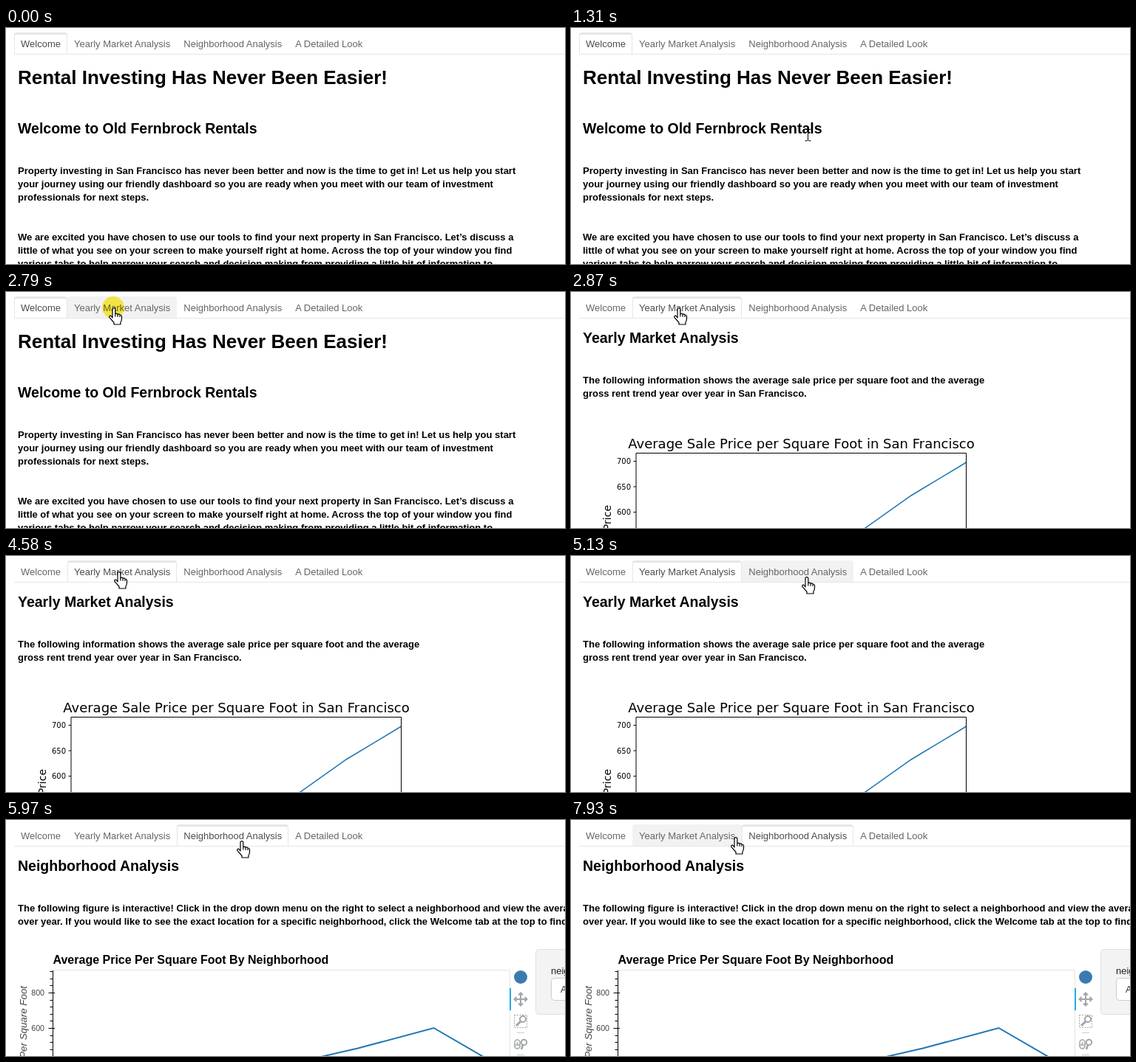
These frames come from a looping animation (756x320 px, 8000 ms). An HTML page:

```html
<!DOCTYPE html>
<html lang="en">
<head>
<meta charset="utf-8">
<title>Rental dashboard</title>
<style>
html, body { margin: 0; width: 100%; height: 100%; overflow: hidden; background: #fff; }
body, text { font: 13px "Liberation Sans", Arial, sans-serif; }
svg { position: absolute; left: 0; top: 0; width: 756px; height: 320px; }
nav { position: absolute; left: 11px; top: 6px; width: 745px; display: flex; border-bottom: 1px solid #e6e6e6; }
nav span { padding: 4px 8px; border: solid transparent; border-width: 3px 1px 0; border-radius: 4px 4px 0 0;
  line-height: 18px; color: #666; white-space: nowrap; }
nav .hover { background: #f2f2f2; }
nav .active { background: #fff; border-color: #e6e6e6; color: #4d4d4d; }
.h1 { font-size: 26px; font-weight: bold; }
.h2 { font-size: 19.5px; font-weight: bold; }
.p { font-weight: bold; }
.plot text { font: 10px "DejaVu Sans", sans-serif; }
.plot .title { font-size: 18px; }
.plot .label { font-size: 14px; }
.axis text { font-size: 10.67px; fill: #444; }
.axis .title { font-size: 16px; font-weight: bold; fill: #000; }
.axis .label { font-size: 13.33px; font-style: italic; }
.end { text-anchor: end; }
.mid { text-anchor: middle; }
.line { fill: none; stroke: #1f77b4; }
.icon { fill: none; stroke: #a1a6a9; stroke-width: 2; }
#click { fill: #fff04a; mix-blend-mode: multiply; }
</style>
</head>
<body>
<svg>
  <g class="page">
    <text class="h1" x="16" y="76">Rental Investing Has Never Been Easier!</text>
    <text class="h2" x="16" y="143">Welcome to Old Fernbrock Rentals</text>
    <text class="p" x="16" y="198">Property investing in San Francisco has never been better and now is the time to get in! Let us help you start</text>
    <text class="p" x="16" y="216">your journey using our friendly dashboard so you are ready when you meet with our team of investment</text>
    <text class="p" x="16" y="234">professionals for next steps.</text>
    <text class="p" x="16" y="288">We are excited you have chosen to use our tools to find your next property in San Francisco. Let’s discuss a</text>
    <text class="p" x="16" y="306">little of what you see on your screen to make yourself right at home. Across the top of your window you find</text>
    <text class="p" x="16" y="324">various tabs to help narrow your search and decision making from providing a little bit of information to</text>
  </g>

  <g class="page">
    <text class="h2" x="16" y="69">Yearly Market Analysis</text>
    <text class="p" x="16" y="124">The following information shows the average sale price per square foot and the average</text>
    <text class="p" x="16" y="142">gross rent trend year over year in San Francisco.</text>
    <g class="plot">
      <text class="title mid" x="311.5" y="212">Average Sale Price per Square Foot in San Francisco</text>
      <text class="end" x="81" y="233">700</text>
      <text class="end" x="81" y="268">650</text>
      <text class="end" x="81" y="302">600</text>
      <text class="label end" transform="translate(54 289) rotate(-90)">Price</text>
      <path class="line" stroke-width="1.5" d="M386 328.500L460 276L534.500 231"/>
      <path fill="none" stroke="#000" d="M88 330V218.500H534.500V330M84.500 229.500H88M84.500 264H88M84.500 298.500H88"/>
    </g>
  </g>

  <g class="page">
    <text class="h2" x="16" y="69">Neighborhood Analysis</text>
    <text class="p" x="16" y="124">The following figure is interactive! Click in the drop down menu on the right to select a neighborhood and view the average price year</text>
    <text class="p" x="16" y="142">over year. If you would like to see the exact location for a specific neighborhood, click the Welcome tab at the top to find it there</text>
    <g class="axis">
      <text class="title" x="63.500" y="195">Average Price Per Square Foot By Neighborhood</text>
      <path fill="none" stroke="#e5e5e5" d="M64 203.500H681.500V330"/>
      <path class="line" stroke-width="2" d="M374 333L476 309.500L578.500 282L680 341"/>
      <path id="ticks" fill="none" stroke="#000"/>
      <text class="end" x="52" y="238">800</text>
      <text class="end" x="52" y="286">600</text>
      <text class="label end" transform="translate(28 225) rotate(-90)">Per Square Foot</text>
    </g>
    <circle cx="696" cy="213" r="9" fill="#3b7ab0"/>
    <path fill="#26aae1" d="M681 228h2v30h-2z"/>
    <path class="icon" d="M688 243H704M696 235V251M693 237.500L696 234.500L699 237.500M693 248.500L696 251.500L699 248.500M690.500 240L687.500 243L690.500 246M701.500 240L704.500 243L701.500 246"/>
    <path class="icon" style="stroke-width:1" stroke-dasharray="2 1.500" d="M687.500 264.500H704.500V281.500H687.500Z"/>
    <g id="lens" class="icon"><circle cx="699" cy="270" r="4"/><path stroke-width="3" d="M696 273L690 279"/></g>
    <g class="icon">
      <rect x="688" y="298" width="7" height="12" rx="3.500" stroke-width="1.500"/>
      <path stroke-width="1.500" d="M691.500 301V304M688 305H695"/>
      <circle cx="700.500" cy="301.500" r="3.700"/><path stroke-width="2.500" d="M699 305L697 311"/>
    </g>
    <path stroke="#ccc" d="M691 288.500H701M691 318.500H701"/>
    <rect x="716.500" y="175.500" width="200" height="88" rx="4" fill="#f3f3f3" stroke="#e0e0e0"/>
    <text x="737" y="209" fill="#222">neighborhood</text>
    <rect x="737.500" y="214.500" width="150" height="30" rx="4" fill="#fff" stroke="#ccc"/>
    <text x="750" y="234" fill="#333">A</text>
  </g>
</svg>

<nav><span>Welcome</span><span>Yearly Market Analysis</span><span>Neighborhood Analysis</span><span>A Detailed Look</span></nav>

<svg style="mix-blend-mode:multiply"><circle id="click" r="15"/></svg>
<svg>
  <path id="beam" fill="none" stroke="#000" d="M-3.500-7.500H-1L.5-6.500L2-7.500H4.500M.5-6.500V7M-3.500 8H-1L.5 7L2 8H4.500"/>
  <g id="hand" stroke="#000" stroke-width="1.200" stroke-linejoin="round">
    <path fill="#fff" d="M5 14V2.500a1.900 1.900 0 0 1 3.800 0V8.500q1.700-1 3.200.6q1.900-.6 3 .9q2-.2 2.500 1.800V15q0 3-1.600 5V23H7V20.500Q4 17 .8 13.300Q.3 11 2.600 11.200Q4 12 5 14Z"/>
    <path fill="none" d="M8.800 8.500V12.500M12 9.300V12.800M15 10.200V13"/>
  </g>
</svg>

<script>
const $ = id => document.getElementById(id);
const pages = [...document.querySelectorAll('.page')];
const tabs = [...document.querySelectorAll('nav span')];
const show = (el, on) => { el.style.display = on ? '' : 'none'; };

// Major tick every fifth one
let ticks = 'M63.500 204V330';
for (let i = -3; i < 9; i++) ticks += `M${i % 5 ? 59.5 : 57.5} ${Math.round(234 + i * 9.6) + .5}H${i % 5 ? 63.5 : 66}`;
$('ticks').setAttribute('d', ticks);

// Pointer keys: time, x, y, steps taken to get there, eased
const keys = [
  [1080, 549, 283], [1310, 320, 145, 3], [1570, 156, 28, 3], [1720, 150, 24, 1], [1790, 146, 21, 1],
  [4501, 146, 21, 1], [5130, 319, 28, 8, true], [7772, 319, 28, 1], [7930, 223, 23, 2]
];

function pointer(t) {
  const i = keys.findIndex(k => k[0] > t);
  if (i < 0) return keys[keys.length - 1].slice(1, 3);
  const [t0, x0, y0] = keys[i - 1], [t1, x1, y1, steps, eased] = keys[i];
  let p = Math.floor((t - t0) / (t1 - t0) * steps) / steps;
  if (eased) p = p * p * (3 - 2 * p);
  return [x0 + (x1 - x0) * p, y0 + (y1 - y0) * p];
}

function draw(now) {
  const t = now % 8000;
  const page = t < 2870 ? 0 : t < 5900 ? 1 : 2;
  const moving = t >= 1080;
  const [x, y] = moving ? pointer(t) : [-50, -50];
  const overTabs = moving && y < 36;
  const clicked = t >= 2790 && t < 2870 || t >= 5820 && t < 5900;

  pages.forEach((el, i) => show(el, i === page));
  tabs.forEach((el, i) => {
    const { left, right } = el.getBoundingClientRect();
    el.className = i === page ? 'active' : overTabs && x >= left && x < right ? 'hover' : '';
  });
  show($('beam'), moving && !overTabs);
  show($('hand'), overTabs);
  show($('click'), clicked);
  $('beam').setAttribute('transform', `translate(${Math.round(x)} ${Math.round(y)})`);
  $('hand').setAttribute('transform', `translate(${Math.round(x) - 7} ${Math.round(y)})`);
  $('click').setAttribute('transform', `translate(${x - 1} ${y})`);
  requestAnimationFrame(draw);
}
requestAnimationFrame(draw);
</script>
</body>
</html>
```
